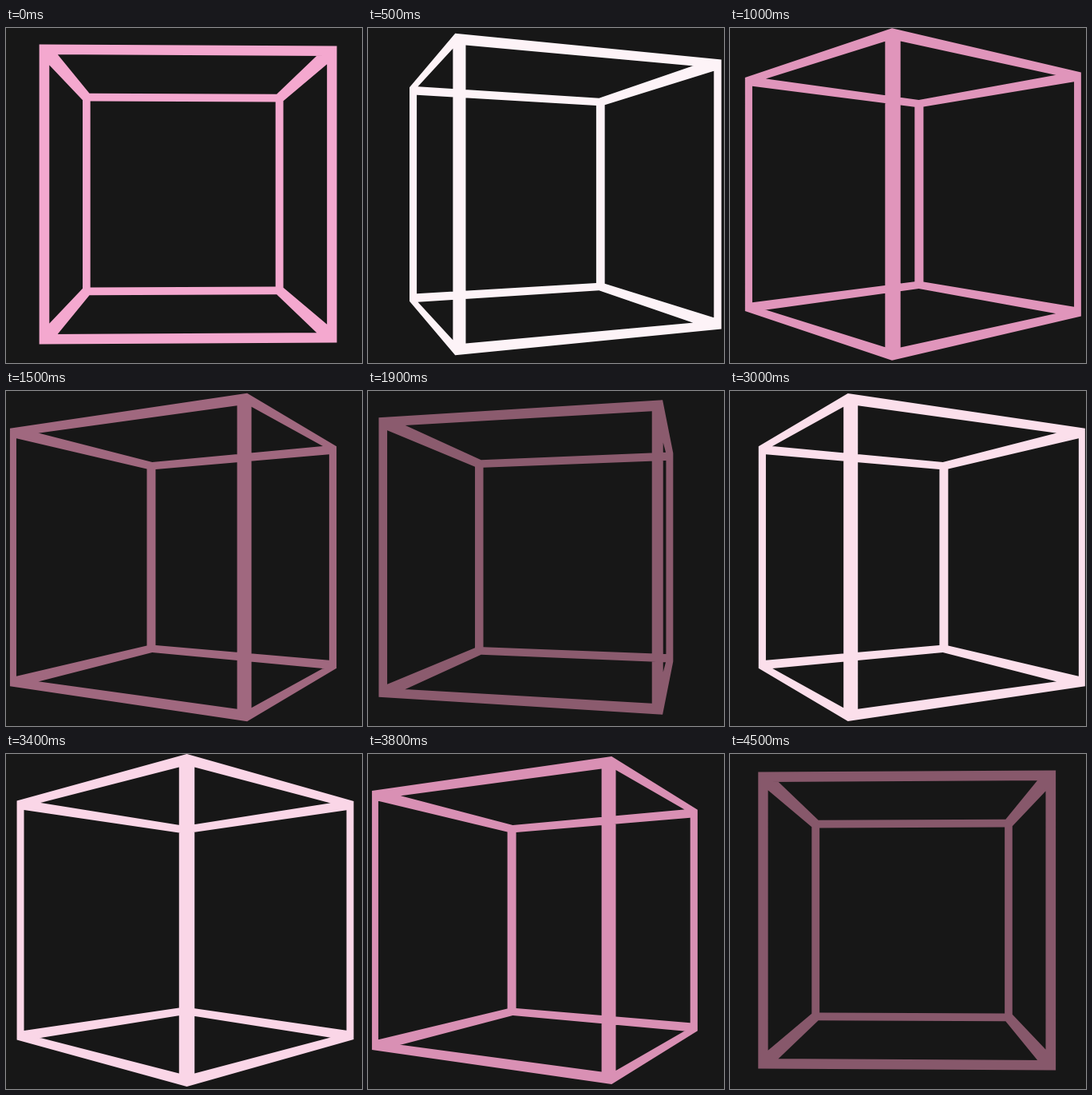
An HTML page with a canvas that plays this animation: 446x419 px, repeating every 4600 ms.

```html
<!DOCTYPE html>
<html lang="en">
<head>
<meta charset="utf-8">
<title>Rotating wire cube</title>
<style>
  html, body { margin: 0; width: 100%; height: 100%; overflow: hidden; background: #171717; }
  canvas { display: block; }
</style>
</head>
<body>
<canvas id="stage" width="446" height="419"></canvas>
<script>
const ctx = document.getElementById('stage').getContext('2d');
const LOOP = 4600, STEP = 100;
const HALF = 149.2, BORDER = 10, DEPTH = 746;
const CENTER = [224.9, 208];
const START = 1.3, SPEED = 39.42; // degrees, degrees per second
const CORNERS = [[-1, -1], [1, -1], [1, 1], [-1, 1]];

// Glow: swings between its darkest and brightest point
const DARKEST = 1805, SWING = 1375;
const GLOW = [ // ms away from the darkest point, r, g, b
  [0, 129, 85, 103],
  [305, 160, 104, 127],
  [495, 184, 122, 149],
  [780, 220, 146, 183],
  [945, 244, 168, 207],
  [1195, 251, 223, 235],
  [1375, 255, 255, 255]
];

function glowAt(time) {
  const phase = Math.abs(time - DARKEST) % (2 * SWING);
  const away = Math.min(phase, 2 * SWING - phase);
  const i = Math.max(1, GLOW.findIndex(stop => stop[0] >= away));
  const [from, to] = [GLOW[i - 1], GLOW[i]];
  const k = (away - from[0]) / (to[0] - from[0]);
  const rgb = [1, 2, 3].map(c => Math.round(from[c] + (to[c] - from[c]) * k));
  return `rgb(${rgb})`;
}

function project([x, y, z], angle) {
  const sin = Math.sin(angle), cos = Math.cos(angle);
  const scale = DEPTH / (DEPTH - (z * cos - x * sin));
  return [CENTER[0] + (x * cos + z * sin) * scale, CENTER[1] + y * scale];
}

function square(axis, side, size, angle) {
  return CORNERS.map(([u, v]) => {
    const point = [];
    point[axis] = side * HALF;
    point[(axis + 1) % 3] = u * size;
    point[(axis + 2) % 3] = v * size;
    return project(point, angle);
  });
}

function isClockwise([a, b, c]) {
  return (b[0] - a[0]) * (c[1] - a[1]) > (b[1] - a[1]) * (c[0] - a[0]);
}

function addLoop(points, clockwise) {
  if (isClockwise(points) !== clockwise) points.reverse();
  ctx.moveTo(...points[0]);
  for (const point of points.slice(1)) ctx.lineTo(...point);
  ctx.closePath();
}

function draw(now) {
  const time = Math.floor(now % LOOP / STEP) * STEP;
  const angle = (START + SPEED * time / 1000) * Math.PI / 180;
  ctx.fillStyle = '#171717';
  ctx.fillRect(0, 0, 446, 419);
  // One path with matching windings, so that neighbouring faces leave no seam
  ctx.beginPath();
  for (const axis of [0, 1, 2])
    for (const side of [-1, 1]) {
      addLoop(square(axis, side, HALF, angle), true);
      addLoop(square(axis, side, HALF - BORDER, angle), false);
    }
  ctx.fillStyle = glowAt(time);
  ctx.fill();
}

const begin = performance.now();
function tick() {
  draw(performance.now() - begin);
  requestAnimationFrame(tick);
}
tick();
</script>
</body>
</html>
```
